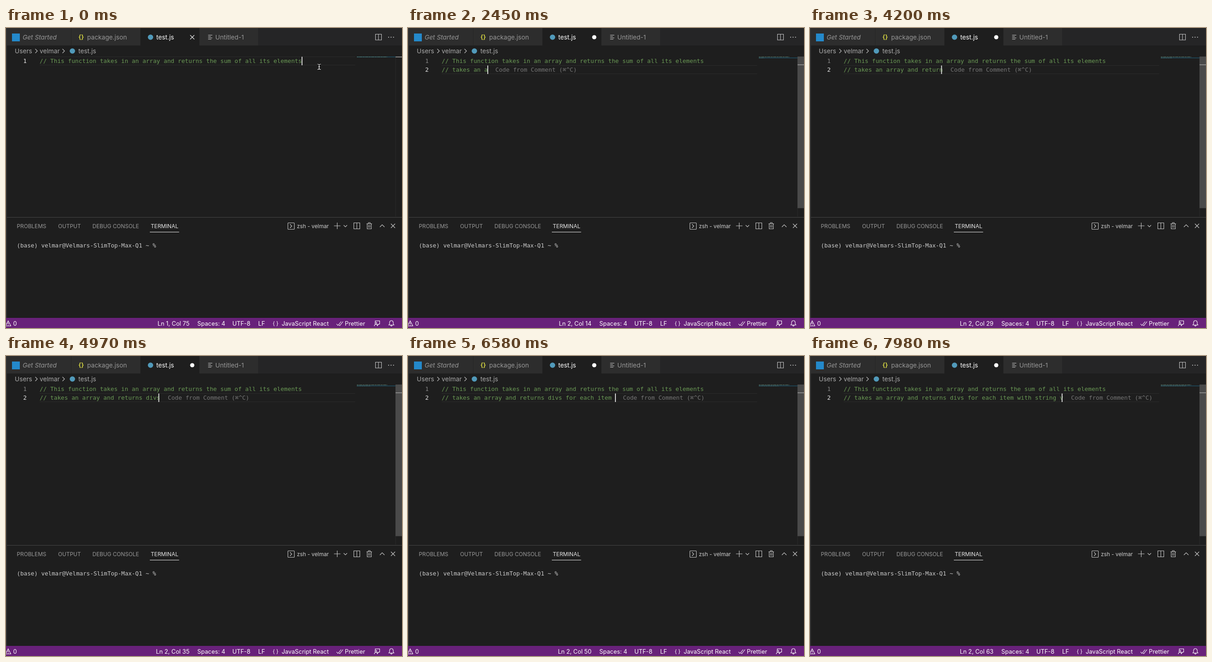
An HTML page that plays this animation: 859x652 px, repeating every 8000 ms.

```html
<!DOCTYPE html>
<html lang="en">
<head>
<meta charset="utf-8">
<title>Editor typing</title>
<style>
  html, body { margin: 0; width: 100%; height: 100%; overflow: hidden; background: #1e1e1e; }
  svg { display: block; width: 859px; height: 652px; }
  text { white-space: pre; font-family: Inter, sans-serif; }
  .tab { font-size: 13.7px; fill: #979797; }
  .crumb { font-size: 13.7px; fill: #a9a9a9; }
  .panel { font-size: 11.8px; fill: #989898; }
  .status { font-size: 12.8px; fill: #fff; }
  .code { font: 12.77px "DejaVu Sans Mono", monospace; fill: #6a9955; }
  .term { font: 12.55px "DejaVu Sans Mono", monospace; fill: #ccc; }
  .num { text-anchor: end; fill: #858585; }
  .on { fill: #e7e7e7; }
  .active { fill: #fff; }
  .ghost { fill: #757575; }
  .icon { fill: none; stroke: #c5c5c5; stroke-width: 1.1; }
  .border { fill: none; stroke: #2b2b2b; }
</style>
</head>
<body>
<svg viewBox="0 0 859 652">
  <!-- tabs -->
  <rect width="859" height="38" fill="#252526"/>
  <rect width="141" height="38" fill="#2d2d2d"/>
  <rect x="142" width="149" height="38" fill="#2d2d2d"/>
  <rect x="292" width="127" height="38" fill="#1e1e1e"/>
  <rect x="420" width="127" height="38" fill="#2d2d2d"/>
  <rect x="13" y="12" width="17" height="17" fill="#2489ca"/>
  <text class="tab" x="36" y="25" font-style="italic">Get Started</text>
  <text x="157" y="24" font-size="13" font-weight="700" fill="#cbcb41">{}</text>
  <text class="tab" x="176" y="25">package.json</text>
  <circle cx="313.5" cy="20" r="5.8" fill="#519aba"/>
  <text class="tab active" x="326" y="25">test.js</text>
  <path id="close" class="icon" stroke-width="1.4" style="stroke:#eee" d="M399.5 15.5l9 9m0-9l-9 9"/>
  <circle id="dirty" cx="404" cy="20" r="4.6" fill="#fff"/>
  <path class="icon" d="M438.500 15.500h9m-9 3h6m-6 3h9m-9 3h7"/>
  <text class="tab" x="454" y="25">Untitled-1</text>
  <path class="icon" d="M801.500 13.500h13v12.500h-13zm6.500 0v12.500"/>
  <path class="icon" stroke-linecap="round" style="stroke-width:2.2" d="M830 20h0m5.300 0h0m5.300 0h0"/>

  <!-- breadcrumbs -->
  <text class="crumb" x="19" y="55">Users</text>
  <text class="crumb" x="73" y="55">velmar</text>
  <path class="icon" d="M63.500 45.500l4.500 4.500-4.500 4.500M122.500 45.500l4.500 4.500-4.500 4.500"/>
  <circle cx="144" cy="50" r="5.8" fill="#519aba"/>
  <text class="crumb" x="157" y="55">test.js</text>

  <!-- editor -->
  <path class="border" d="M845 62V410"/>
  <path id="lineBox" class="border" d="M73 62.500H757.500M73 80.500H757.500"/>
  <g class="code">
    <text id="num1" class="code num" x="45" y="76">1</text>
    <text id="num2" class="code num on" x="45" y="95">2</text>
    <text class="code" x="73" y="76">// This function takes in an array and returns the sum of all its elements</text>
    <text id="typed" class="code" x="73" y="95"></text>
    <text id="ghost" class="code ghost" y="95">Code from Comment (⌘^C)</text>
  </g>
  <rect id="caret" width="1.8" height="18.500" fill="#e4e4e4"/>
  <rect id="miniLine" x="761" width="84" height="1.600" fill="#1f4a5c"/>
  <path id="mini1" d="M761 62.800h66" stroke="#5d7f72" stroke-dasharray="4 1 7 1"/>
  <path id="mini2" stroke="#4f7a78" stroke-dasharray="4 1" stroke-width=".8"/>
  <rect id="slider" x="845" y="62" width="14" height="329.500" fill="#4a4a4a"/>
  <rect id="ruler" x="845" width="14" height="1.800" fill="#8d8d8d"/>
  <g id="pointer" fill="none">
    <path id="beam" d="M675.500 78.500q3.800 0 3.800 2v7.500q0 2-3.800 2m7.600-11.500q-3.800 0-3.800 2m0 7.500q0 2 3.800 2m-5.500-5.700h3.400" stroke="#000" stroke-width="3"/>
    <use href="#beam" style="filter:invert(1)" display="none"/>
    <path d="M675.500 78.500q3.800 0 3.800 2v7.500q0 2-3.800 2m7.600-11.500q-3.800 0-3.800 2m0 7.500q0 2 3.800 2m-5.500-5.700h3.400" stroke="#fff" stroke-width="1.200"/>
  </g>

  <!-- panel -->
  <path d="M0 411.500H859" stroke="#454545"/>
  <text class="panel" x="23.500" y="435">PROBLEMS</text>
  <text class="panel" x="113" y="435">OUTPUT</text>
  <text class="panel" x="187.500" y="435">DEBUG CONSOLE</text>
  <text class="panel on" x="314" y="435">TERMINAL</text>
  <path d="M312 443.500H375.500" stroke="#e7e7e7"/>
  <rect class="icon" x="611.500" y="423.500" width="14" height="14" rx="1"/>
  <path class="icon" d="M616 426.500l4 4-4 4"/>
  <text class="panel" x="631" y="434.500" style="fill:#ccc">zsh - velmar</text>
  <path class="icon" d="M711.500 430h14m-7-7v14M732.500 428.500l3.700 3.700 3.700-3.700"/>
  <path class="icon" d="M754.500 423.500h13v13h-13zm6.500 0v13"/>
  <path class="icon" d="M782 425.500h12m-8 0v-2.500h4v2.500m-6.500 0v11h9v-11m-6 2.500v6m3-6v6"/>
  <path class="icon" d="M811 432.500l5-5 5 5M835 425.500l9 9m0-9l-9 9"/>
  <text class="term" x="23.500" y="477">(base) velmar@Velmars-SlimTop-Max-Q1 ~ %</text>

  <rect width="2" height="630" fill="#343434"/>

  <!-- status bar -->
  <rect y="630" width="859" height="22" fill="#68217a"/>
  <g class="icon" style="stroke:#fff">
    <path d="M-1 647.500L4.700 636.500 10.500 647.500zM4.700 640v4m0 1v1.300"/>
    <path d="M717 643l3 3.500 7-8.500m-4.500 7.500l1.500 1.500 7-9"/>
    <path d="M801 639v-2.500h9.500v7h-2l-2.500 2.500v-2.500M799 648q0-4 3.300-4t3.300 4"/>
    <circle cx="802.300" cy="641.500" r="1.900"/>
    <path d="M830.500 645.500h11l-1.500-2.500v-3q-.5-4-4-4t-4 4v3zm4 .5q0 2 1.500 2t1.500-2"/>
  </g>
  <text class="status" x="15.500" y="647">0</text>
  <text id="position" class="status" x="398" y="647" text-anchor="end"></text>
  <text class="status" x="415" y="647">Spaces: 4</text>
  <text class="status" x="491" y="647">UTF-8</text>
  <text class="status" x="547" y="647">LF</text>
  <text class="status" x="578.500" y="646" style="font-size:11px">{ }</text>
  <text class="status" x="598" y="647">JavaScript React</text>
  <text class="status" x="735" y="647">Prettier</text>
</svg>
<script>
const LOOP = 8000, STEP = 70, LEFT = 73, CHAR = 7.69, MINI = 0.89;
const POINTER_HIDE = 70, ENTER = 350;
const comment = "// takes an array and returns divs for each item with string v";
// Moment of each key press, in ms
const keys = [
  630, 770, 910, 1050, 1120, 1260, 1330, 1470, 1610, 1680, 1750, 1820, 2450,
  2730, 2800, 2940, 3010, 3080, 3220, 3290, 3430, 3500,
  3710, 3780, 3920, 3990, 4130, 4200, 4340, 4410,
  4550, 4690, 4830, 4970, 5040, 5110, 5180, 5250,
  5390, 5530, 5600, 5740, 5810, 5950, 6020, 6160, 6230, 6300,
  6580, 6720, 6790, 6860, 6930, 7000, 7210, 7280,
  7490, 7560, 7630, 7700, 7840, 7980
];

const $ = id => document.getElementById(id);
const set = (id, attrs) => {
  for (const name in attrs) $(id).setAttribute(name, attrs[name]);
};
const show = (id, visible) => set(id, { visibility: visible ? "visible" : "hidden" });

// The caret glides: it covers part of the last character before settling
function caretColumn(count, t) {
  const age = t - keys[count - 1];
  const pause = keys[count - 1] - (keys[count - 2] ?? ENTER);
  return age < STEP && pause < 250 ? count - 0.4 : count;
}

function render(now) {
  const t = Math.floor(now % LOOP / STEP) * STEP;
  const split = t >= ENTER;
  const count = keys.filter(k => k <= t).length;
  const text = comment.slice(0, count);
  const row = split ? 19 : 0;

  show("pointer", t < POINTER_HIDE);
  show("close", !split);
  for (const id of ["dirty", "num2", "slider", "mini2"]) show(id, split);
  show("ghost", count > 1);

  $("num1").classList.toggle("on", !split);
  $("typed").textContent = text;
  $("position").textContent = split ? `Ln 2, Col ${count + 1}` : "Ln 1, Col 75";
  set("lineBox", { transform: `translate(0 ${row})` });
  set("ghost", { x: LEFT + count * CHAR + 16.5 });
  set("caret", { x: LEFT - 0.8 + CHAR * (split ? caretColumn(count, t) : 74), y: 62.5 + row });
  set("miniLine", { y: split ? 64.2 : 62 });
  set("mini2", { d: `M761 65h${text.trimEnd().length * MINI}` });
  set("ruler", { y: split ? 79 : 62 });
  requestAnimationFrame(render);
}
requestAnimationFrame(render);
</script>
</body>
</html>
```
